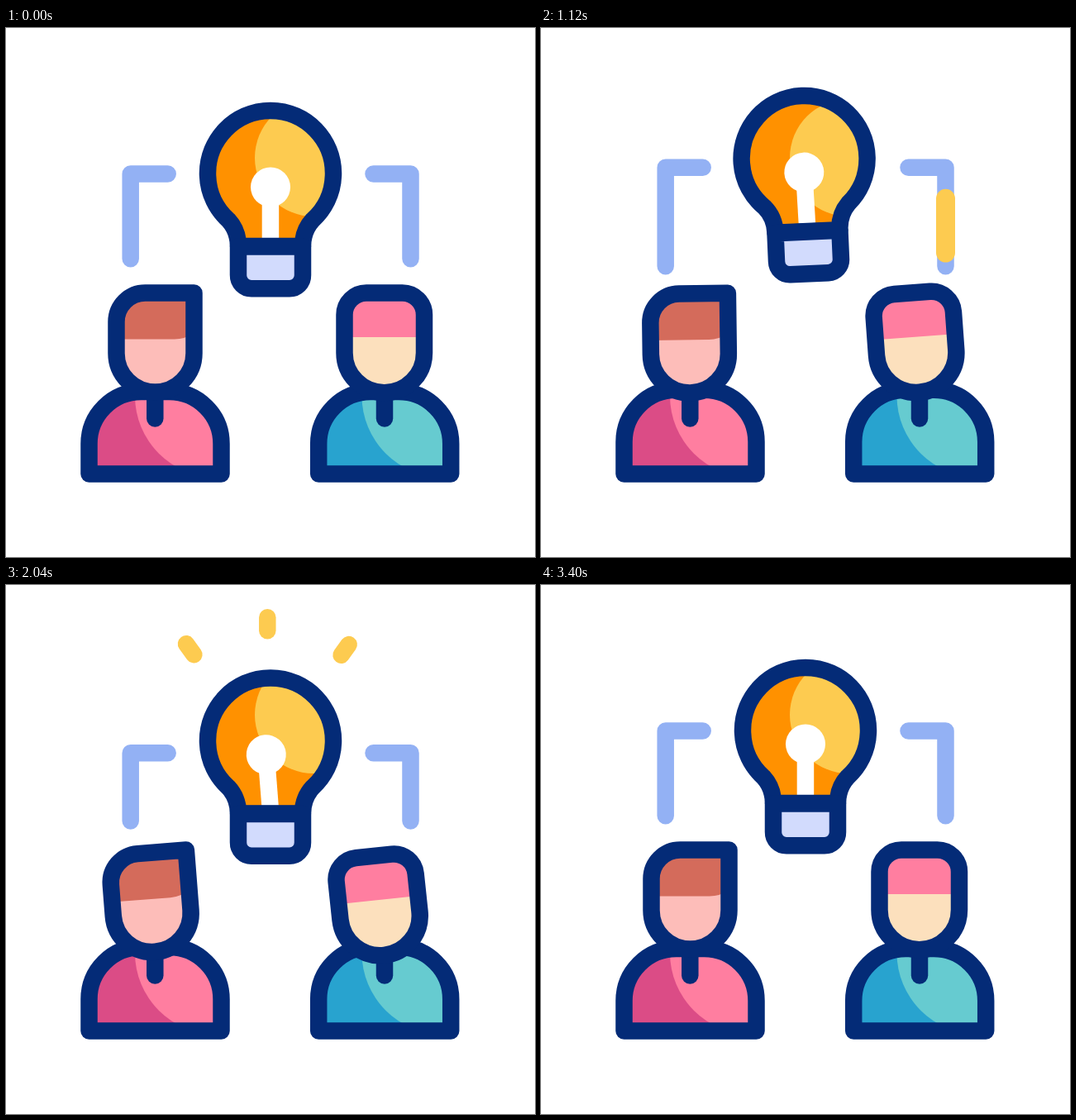
An HTML page that plays this animation: 640 by 640 pixels, repeating every 3600 ms.

```html
<!DOCTYPE html>
<html lang="en">
<head>
<meta charset="utf-8">
<title>Shared idea</title>
<style>
  html, body { margin: 0; width: 100%; height: 100%; overflow: hidden; background: #fff; }
  svg { display: block; width: 100vw; height: 100vh; }
  .ink { fill: none; stroke: #042b77; stroke-width: 20.5; stroke-linecap: round; stroke-linejoin: round; }
  .line, .pulse, .spark { fill: none; stroke-linecap: round; stroke-linejoin: round; }
  .line { stroke: #93b1f4; stroke-width: 20.5; }
  .pulse { stroke: #fdcb50; stroke-width: 23; }
  .spark { stroke: #fdcb50; stroke-width: 20.5; }
</style>
</head>
<body>
<svg viewBox="0 0 640 640">
  <defs>
    <path id="torso"/>
    <path id="glass" d="M281 264C281 252 277 241 269 232.3A76 76 0 1 1 371 232.3C363 241 359 252 359 264Z"/>
    <path id="face1" d="M227.5 320.5H168.5A35 35 0 0 0 133.5 355.5V393.5A47 47 0 0 0 227.5 393.5Z"/>
    <path id="face2" d="M436 320.5H479.5A26.5 26.5 0 0 1 506 347V393A48.2 48.2 0 0 1 409.5 393V347A26.5 26.5 0 0 1 436 320.5Z"/>
    <clipPath id="torsoClip"><use href="#torso"/></clipPath>
    <clipPath id="glassClip"><use href="#glass" class="sway"/></clipPath>
    <clipPath id="clip1"><use href="#face1"/></clipPath>
    <clipPath id="clip2"><use href="#face2"/></clipPath>
  </defs>

  <g>
    <path class="line"/>
    <path class="pulse" pathLength="1"/>
  </g>
  <g>
    <path class="line"/>
    <path class="pulse" pathLength="1"/>
  </g>

  <g class="sway">
    <path class="spark" pathLength="1" d="M230.5 76L218 58.7"/>
    <path class="spark" pathLength="1" d="M316.3 48V26.7"/>
    <path class="spark" pathLength="1" d="M402.5 76.5L414.7 59.5"/>
  </g>

  <g clip-path="url(#glassClip)">
    <rect width="640" height="640" fill="#ff9100"/>
    <circle cx="372" cy="157" r="71" fill="#fdcb50"/>
  </g>
  <g class="sway">
    <g id="filament" fill="#fff">
      <circle cx="320" cy="192.5" r="24"/>
      <rect x="309.7" y="192" width="20.5" height="70"/>
    </g>
    <use href="#glass" class="ink"/>
    <path class="ink" style="fill:#d2dbfd" d="M281 264.5H359V299A16 16 0 0 1 343 315.3H297A16 16 0 0 1 281 299Z"/>
  </g>

  <g>
    <g clip-path="url(#torsoClip)">
      <rect x="90" y="420" width="182" height="130" fill="#db4c86"/>
      <circle cx="254.6" cy="445" r="98.6" fill="#ff7ea0"/>
    </g>
    <use href="#torso" class="ink"/>
    <path class="ink" d="M180.3 440V472.5"/>
  </g>
  <g transform="translate(277.7)">
    <g clip-path="url(#torsoClip)">
      <rect x="90" y="420" width="182" height="130" fill="#28a3cf"/>
      <circle cx="251.4" cy="445" r="98.6" fill="#66cbd0"/>
    </g>
    <use href="#torso" class="ink"/>
    <path class="ink" d="M180.3 440V472.5"/>
  </g>

  <g id="head1">
    <g clip-path="url(#clip1)">
      <rect x="120" y="310" width="120" height="140" fill="#fdbdb9"/>
      <path d="M130 315H230V368Q217 376.5 204 376.5H130Z" fill="#d46b5b"/>
    </g>
    <use href="#face1" class="ink"/>
  </g>
  <g id="head2">
    <g clip-path="url(#clip2)">
      <rect x="395" y="310" width="125" height="140" fill="#fce0bd"/>
      <rect x="400" y="315" width="120" height="59" fill="#ff7ea0"/>
    </g>
    <use href="#face2" class="ink"/>
  </g>
</svg>
<script>
const LOOP = 3600;
const all = s => [...document.querySelectorAll(s)];
const byId = id => document.getElementById(id);
const ramp = (t, from, to) => Math.min(1, Math.max(0, (t - from) / (to - from)));
const ease = u => (1 - Math.cos(Math.PI * u)) / 2;

// Rest, three eased extremes, rest again.
const glide = (times, ...peaks) => {
  const values = [0, ...peaks, 0];
  return t => values.slice(1).reduce((v, next, i) =>
    v + (next - values[i]) * ease(ramp(t, times[i], times[i + 1])), 0);
};

const ROCK = [0, 740, 1430, 2150, 3400];
const LIFT = [0, 620, 1500, 2040, 2500];
const rock = (start, pace, ...peaks) => glide(ROCK.map(t => start + t * pace), ...peaks);
const lift = (...peaks) => glide(LIFT, ...peaks);

const bulbY = lift(-36.5, -6, 12.5);
const barTop = lift(-18.3, -1, 26.7);
const barFoot = lift(19.7, 2, 6.3);
const bulbTurn = rock(140, 0.88, -10.4, 3.5, 0);
const swing = rock(260, 0.8, -9.3, 8.3, -4.5);
const breathe = rock(0, 1, -5, -0.3, -2);
const heads = [
  { el: byId('head1'), x: 180.5, turn: rock(0, 1, -13.2, 8.2, -5.2),
    drop: glide([0, 400, 1000, 2040, 3400], 10.5, 0.8, 3.3) },
  { el: byId('head2'), x: 457.7, turn: rock(140, 0.93, -15.8, 11.2, -7),
    drop: glide([0, 520, 1500, 2040, 3400], 9, -5, 6.7) }
];

const lines = all('.line'), pulses = all('.pulse'), sparks = all('.spark'), swaying = all('.sway');

function trim(el, tail, head) {
  const on = head > tail;
  el.style.visibility = on ? 'visible' : 'hidden';
  if (!on) return;
  el.setAttribute('stroke-dasharray', `${head - tail} 3`);
  el.setAttribute('stroke-dashoffset', -tail);
}

const pose = (el, y, angle, cx, cy) =>
  el.setAttribute('transform', `translate(0 ${y}) rotate(${angle} ${cx} ${cy})`);

function draw(t) {
  for (const el of swaying) pose(el, bulbY(t), bulbTurn(t), 320, 208);
  pose(byId('filament'), 0, swing(t), 320, 260);

  const top = 176.5 + barTop(t), foot = 279.3 + barFoot(t);
  const left = `M150.7 ${foot}V${top}H195.7`, right = `M444.5 ${top}H489.5V${foot}`;
  [left, right].forEach((d, i) => {
    lines[i].setAttribute('d', d);
    pulses[i].setAttribute('d', d);
    const start = i ? 670 : 30;
    trim(pulses[i], ramp(t, start + 200, start + 700), ramp(t, start, start + 500));
  });

  const [from, to] = t < 1300 ? [785, 1090] : [1510, 2260];
  for (const el of sparks) trim(el, ramp(t, from + 160, to) ** 3, ramp(t, from, from + 160));

  const b = breathe(t);
  byId('torso').setAttribute('d', `M100.5 539.5V${503 + b}a63 63 0 0 1 63 -63h34a63 63 0 0 1 63 63V539.5Z`);

  for (const h of heads) pose(h.el, h.drop(t), h.turn(t), h.x, 443);
}

const began = performance.now();
function tick() {
  draw((performance.now() - began) % LOOP);
  requestAnimationFrame(tick);
}
tick();
</script>
</body>
</html>
```
